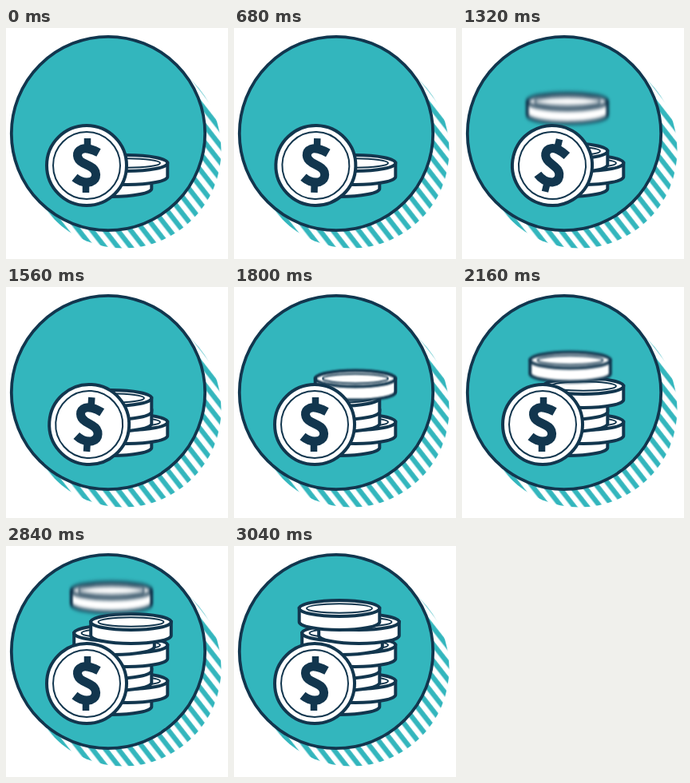
Write an HTML page that moves like this. It is 278 px wide and 289 px high and loops after 3.96 s.

```html
<!DOCTYPE html>
<html lang="en">
<head>
<meta charset="utf-8">
<title>Stacking coins</title>
<style>
  html, body { margin: 0; width: 100%; height: 100%; overflow: hidden; background: #fff; }
  svg { display: block; width: 100vw; height: 100vh; }
  .ink { stroke: #12364e; stroke-width: 4; fill: #fff; }
  .thin { stroke-width: 2; }
  .sign { fill: none; stroke-linejoin: round; }
</style>
</head>
<body>
<svg viewBox="0 0 278 289">
  <defs>
    <pattern id="stripes" width="12.8" height="12.8" patternUnits="userSpaceOnUse" patternTransform="rotate(-38)">
      <rect x="2.5" width="6.2" height="12.8" fill="#33b6bd"/>
    </pattern>
    <clipPath id="disc"><circle cx="128" cy="132" r="119.5"/></clipPath>
    <g id="coin" class="ink">
      <path d="M-50.3 0V17A50.3 10 0 0 0 50.3 17V0Z"/>
      <ellipse rx="50.3" ry="10"/>
      <ellipse class="thin" rx="41" ry="5.8"/>
    </g>
  </defs>
  <circle cx="147" cy="153" r="122.5" fill="url(#stripes)"/>
  <circle cx="128" cy="132" r="121.2" fill="#33b6bd" stroke="#12364e" stroke-width="3.8"/>
  <g id="stack" clip-path="url(#disc)"></g>
  <g id="front" class="ink">
    <circle r="50"/>
    <circle class="thin" r="42"/>
    <path class="sign" stroke-width="11" d="M15-16C6-21-2-22-6-20.5C-14-17-13-8-5-3.5L4 1C14 6 14 17 5 20.5C-2 22-9 20-15 15"/>
    <path class="sign" stroke-width="8.5" d="M1-34V-22M-1 22V34"/>
  </g>
</svg>
<script>
const LOOP = 3960, STEP = 40, FALL = 360, TOP = -20;
const stack = document.getElementById('stack');
const front = document.getElementById('front');

// x, resting y, start of the fall in ms
const coins = [
  [132, 184], [152, 169],
  [132, 154, 795], [132, 139, 1200], [152, 124, 1585],
  [135.5, 109, 1985], [156.5, 95, 2385], [132, 78, 2700]
].map(([x, y, start = -FALL], i) => {
  stack.insertAdjacentHTML('beforeend', `
    <filter id="blur${i}" x="-10%" y="-50%" width="120%" height="200%" color-interpolation-filters="sRGB">
      <feGaussianBlur/>
    </filter>
    <g><use href="#coin"/></g>`);
  const node = stack.lastElementChild;
  const blur = node.previousElementSibling.firstElementChild;
  return { x, y, start, node, blur, filter: `url(#blur${i})` };
});

const clamp = v => Math.min(1, Math.max(0, v));

function dropCoin(c, t) {
  const left = 1 - clamp((t - c.start) / FALL);
  const y = c.y - (c.y - TOP) * left ** 3;
  const blur = 6.5 * left ** 2;
  c.node.setAttribute('display', left < 1 ? 'inline' : 'none');
  c.node.setAttribute('transform', `translate(${c.x} ${y})`);
  c.blur.setAttribute('stdDeviation', `${blur * .5} ${blur}`);
  if (blur > .1) c.node.setAttribute('filter', c.filter);
  else c.node.removeAttribute('filter');
}

function rollFront(t) {
  const shift = 14.3 * Math.sin(Math.PI * clamp((t - 650) / 980));
  const angle = shift / 50 * 180 / Math.PI;
  front.setAttribute('transform', `translate(${101 + shift} 172) rotate(${angle})`);
}

const origin = performance.now();
function draw() {
  const t = Math.floor((performance.now() - origin) % LOOP / STEP) * STEP;
  coins.forEach(c => dropCoin(c, t));
  rollFront(t);
  requestAnimationFrame(draw);
}
draw();
</script>
</body>
</html>
```
